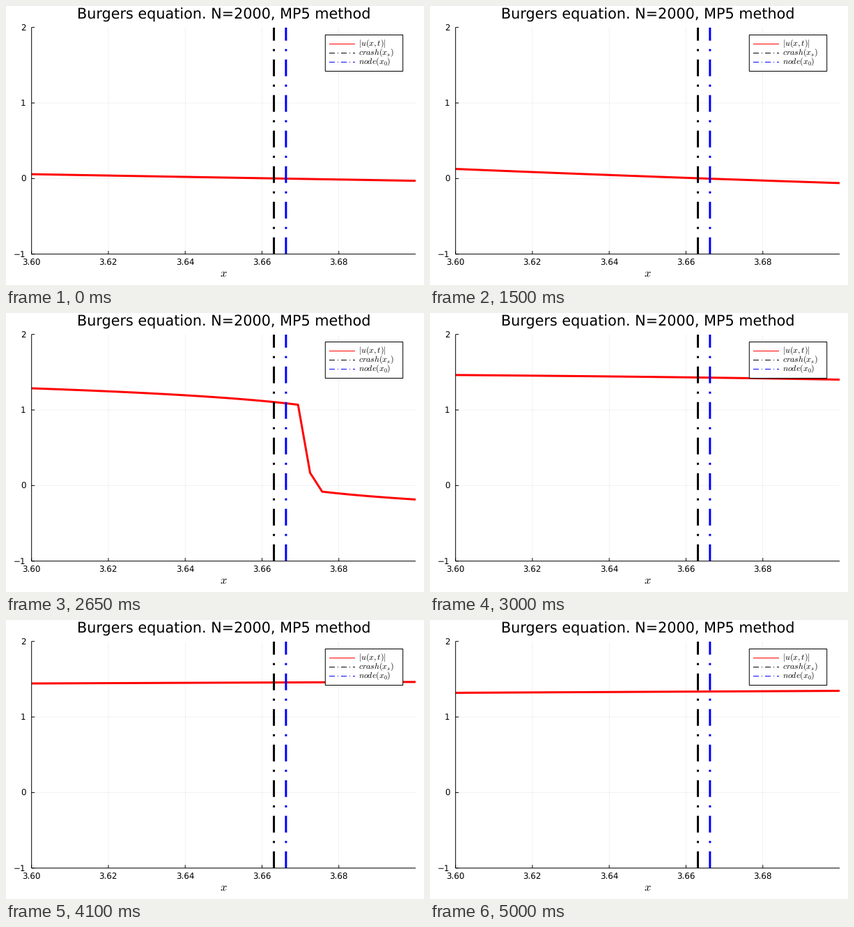
Animation, 600 px wide and 400 px high, one loop 5.05 s. Source, as a matplotlib script:

```python
import numpy as np
import matplotlib.pyplot as plt
from matplotlib.animation import FuncAnimation
from matplotlib.patches import Rectangle

W, H, DPI = 600, 400, 100
PX = 72 / DPI                      # one pixel in points
LEFT, RIGHT, TOP, BOTTOM = 36.7, 588, 30.7, 355.7
FRAMES, INTERVAL, DT = 101, 50, 0.02
CELL = 2 * np.pi / 2000
DASHDOT = (0, (8, 4, 1, 4))
TICK = 4.5

plt.rcParams.update({
    "font.family": "DejaVu Sans",
    "mathtext.fontset": "cm",
    "text.hinting": "none",
    "path.snap": False,
    "lines.dash_capstyle": "butt",
    "lines.solid_capstyle": "butt",
})

grid = CELL * np.arange(1140, 1190)


def burgers(x, t):
    """Entropy solution of u_t + u u_x = 0 with u(x, 0) = 0.5 + sin x."""
    y = x - np.pi - 0.5 * t
    root = np.full_like(y, np.pi)
    for _ in range(60):
        slope = np.maximum(1 - t * np.cos(root), 1e-9)
        root -= (root - t * np.sin(root) - np.abs(y)) / slope
    # the shock is spread over one cell once it has formed
    side = np.sign(y) if t <= 1 else np.clip(2 * y / CELL, -1, 1)
    return 0.5 - side * np.sin(root)


fig = plt.figure(figsize=(W / DPI, H / DPI), dpi=DPI, facecolor="white")

ax = fig.add_axes([LEFT / W, 1 - BOTTOM / H, (RIGHT - LEFT) / W, (BOTTOM - TOP) / H])
ax.set(xlim=(3.6, 3.7), ylim=(-1, 2))
xticks = [3.60, 3.62, 3.64, 3.66, 3.68]
yticks = [-1, 0, 1, 2]
ax.set_xticks(xticks, [])
ax.set_yticks(yticks, [])
ax.tick_params(length=0)
ax.set_axisbelow(True)
ax.grid(color="black", alpha=0.1, lw=0.5 * PX)
ax.spines[:].set_visible(False)

curve, = ax.plot([], [], color="red", lw=3 * PX, zorder=2)
for index, color in ((1166, "black"), (1167, "blue")):
    ax.plot([index * CELL] * 2, [-1, 2], color=color, lw=3 * PX,
            ls=DASHDOT, zorder=3)

# overlay in pixel coordinates for the axis lines, text and legend
over = fig.add_axes([0, 0, 1, 1], zorder=5)
over.set(xlim=(0, W), ylim=(H, 0))
over.axis("off")


def rule(x0, y0, x1, y1, color="black", style="-"):
    over.plot([x0, x1], [y0, y1], color=color, lw=PX, ls=style)


def label(x, y, text, size, ha="center"):
    over.text(x, y, text, fontsize=size * PX, ha=ha, va="baseline")


label(312.5, 19, "Burgers equation. N=2000, MP5 method", 20.8)
label(312, 388, "$x$", 16.4)

rule(LEFT, TOP, LEFT, BOTTOM)
rule(LEFT, BOTTOM, RIGHT, BOTTOM)
for v in xticks:
    x = LEFT + (v - 3.6) * 10 * (RIGHT - LEFT)
    rule(x, BOTTOM, x, BOTTOM - TICK)
    label(x - 0.3, 372.2, f"{v:.2f}", 11.9)
for v in yticks:
    y = BOTTOM - (v + 1) * (BOTTOM - TOP) / 3
    rule(LEFT, y, LEFT + TICK, y)
    label(28.6, y + 4.2, str(v).replace("-", "\u2212"), 11.9, "right")

over.add_patch(Rectangle((458.3, 41.5), 111.4, 52, fc="white", ec="black",
                         lw=PX, zorder=1.5))
entries = [("$|u(x,t)|$", "red", "-"),
           ("$crash(x_s)$", "black", DASHDOT),
           ("$node(x_0)$", "blue", DASHDOT)]
for row, (text, color, style) in enumerate(entries):
    y = 54.5 + 13 * row
    rule(464, y, 501, y, color, style)
    label(506, y + 2.8, text, 11.9, "left")


def update(i):
    curve.set_data(grid, burgers(grid, i * DT))
    return curve,


anim = FuncAnimation(fig, update, frames=FRAMES, interval=INTERVAL,
                     repeat=True, repeat_delay=0)
plt.show()
```
